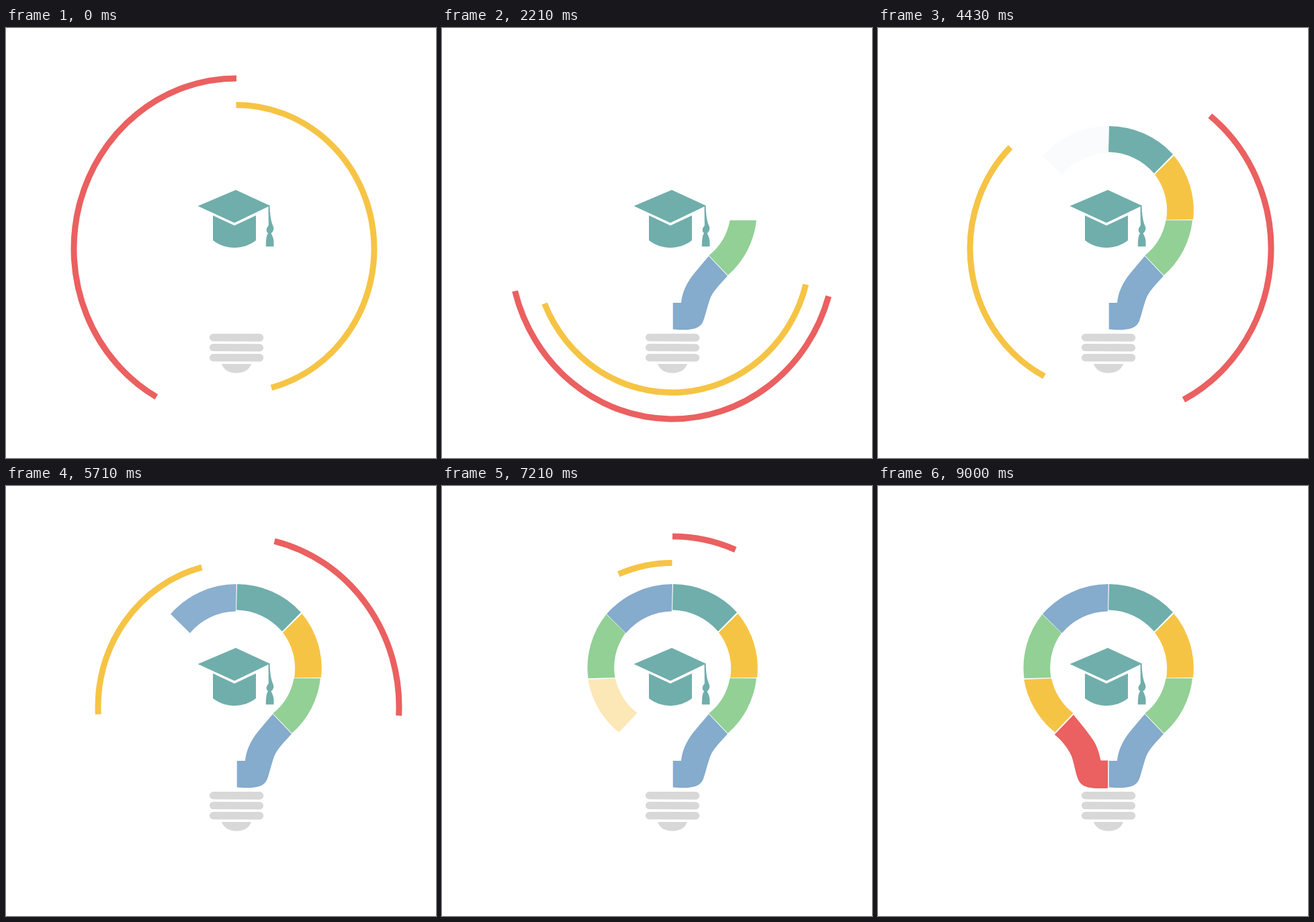
Write an HTML page that moves like this. It is 640 px wide and 640 px high and loops after 9280 ms.

```html
<!DOCTYPE html>
<html lang="en">
<head>
<meta charset="utf-8">
<title>Bulb</title>
<style>
  html, body { margin: 0; width: 100%; height: 100%; overflow: hidden; background: #fff; }
  svg { display: block; width: 100vw; height: 100vh; }
</style>
</head>
<body>
<svg viewBox="0 0 640 640">
  <g fill="none" stroke-width="9">
    <path id="outer" stroke="#eb6060"/>
    <path id="inner" stroke="#f6c445"/>
  </g>
  <g id="glass"></g>
  <g fill="#d8d8d8">
    <path d="M308.500 455H377.500A5.500 5.500 0 0 1 377.500 466.700L308.500 466.200A5.500 5.500 0 0 1 308.500 455Z"/>
    <path d="M308.500 470L377.500 470.300A5.500 5.500 0 0 1 377.500 481.500L308.500 481A5.500 5.500 0 0 1 308.500 470Z"/>
    <path d="M308.500 485H377.500A5.500 5.500 0 0 1 377.500 496.500L308.500 496.200A5.500 5.500 0 0 1 308.500 485Z"/>
    <path d="M321 500H365C362 509 354 513.500 343 513.500S324 509 321 500Z"/>
  </g>
  <g fill="#70aeab">
    <path d="M285.500 265L342 241L393 264.500L340 290Z"/>
    <path d="M308 279L340 294L372 279V316C363 323 352 327 340 327S317 323 308 316Z"/>
    <path d="M390.500 264L392.500 264C393 278 394 287 398 296Q399.500 302 394.500 305.500Q398 312 398.500 317V325.300H386.800C387 317 387 310 390 305.500Q384.500 301 390.800 294Z"/>
  </g>
</svg>
<script>
  const LOOP = 9280, FPS = 14;
  const RED = '#eb6060', YELLOW = '#f6c445', TEAL = '#70aeab', BLUE = '#85abcd', GREEN = '#92d096';

  // [colour, fade start, fade end, outline]
  const segments = [
    [BLUE, 0, 945, 'M397 339.500L425 369C415 380 403 392 399 403C395 414 392 428 388.500 437C384 448 369 451 343.700 448.500V409H356C357 395 364 380 372 369.500C380 359 388 350.500 397 339.500Z'],
    [GREEN, 960, 2130, 'M428.500 286.300H468A127 127 0 0 1 425.500 368L397.300 338.500A87 87 0 0 0 428.500 286.300Z'],
    [YELLOW, 2300, 3600, 'M440.500 190A127 127 0 0 1 469 285L429 285.500A88 88 0 0 0 412 218Z'],
    [TEAL, 3715, 4420, 'M344 146A130 130 0 0 1 439 188L411 216.500A92 92 0 0 0 343 184.500Z'],
    [BLUE, 4360, 5790, 'M245 190.500A130 130 0 0 1 342.800 146L342 186.500A91 91 0 0 0 273.800 219Z'],
    [GREEN, 5780, 6780, 'M244.500 191L273 218.800A88 88 0 0 0 257.500 285.300L217.500 286.300A127 127 0 0 1 244.500 191Z'],
    [YELLOW, 6800, 7860, 'M217.300 288L258 286.500A92 92 0 0 0 290.500 338L263.300 366.500A127 127 0 0 1 217.300 288Z'],
    [RED, 7857, 9000, 'M291 340.500L262.800 370C272 377 283 390 288 402C292 413 294 428 298 437C303 448 313 451 342.200 449.800V408.500H331.500C329 396 325 384 318 375C310 363 300 352 291 340.500Z']
  ];

  // [ms, degrees from the top]
  const tail = [[0, 0], [860, 41.7], [2210, 104.2], [4430, 207.6], [5710, 266.8], [6710, 312.6], [7210, 337], [7710, 360]];
  const rings = [
    { id: 'outer', cx: 343, rx: 242, ry: 253.5, dir: -1,
      head: [[0, 150.5], [2210, 253.6], [3100, 295.3], [5710, 346.4], [6404, 360]] },
    { id: 'inner', cx: 342.5, rx: 205.5, ry: 214, dir: 1,
      head: [[0, 165.2], [860, 198.2], [2210, 247.4], [3350, 289], [4430, 315], [5710, 345.5], [6330, 360]] }
  ];

  const clamp = v => Math.max(0, Math.min(1, v));

  function track(keys, t) {
    for (let i = 1; i < keys.length; i++) {
      const [t0, a] = keys[i - 1], [t1, b] = keys[i];
      if (t < t1) return a + (b - a) * (t - t0) / (t1 - t0);
    }
    return keys[keys.length - 1][1];
  }

  function point(r, deg) {
    const a = deg * Math.PI / 180;
    return (r.cx + r.dir * r.rx * Math.sin(a)).toFixed(2) + ' ' + (328.5 - r.ry * Math.cos(a)).toFixed(2);
  }

  const glass = document.getElementById('glass');
  const parts = segments.map(([fill, from, to, d]) => {
    const el = document.createElementNS('http://www.w3.org/2000/svg', 'path');
    el.setAttribute('d', d);
    el.setAttribute('fill', fill);
    glass.append(el);
    return { el, from, to };
  });
  for (const r of rings) r.el = document.getElementById(r.id);

  function draw(ms) {
    const t = Math.floor(ms * FPS / 1000 + 0.07) * 1000 / FPS;
    for (const r of rings) {
      const a = track(tail, t), b = track(r.head, t);
      r.el.setAttribute('d', b - a < 0.1 ? '' :
        `M${point(r, a)}A${r.rx} ${r.ry} 0 0 ${r.dir > 0 ? 1 : 0} ${point(r, b)}`);
    }
    parts.forEach((p, i) => {
      let k = clamp((t - p.from) / (p.to - p.from));
      if (i === 7) k = Math.floor(k * 8 + 0.05) / 8; // the last part fades in eight steps
      p.el.setAttribute('opacity', k.toFixed(3));
    });
  }

  const start = performance.now();
  function tick() {
    draw((performance.now() - start) % LOOP);
    requestAnimationFrame(tick);
  }
  tick();
</script>
</body>
</html>
```
